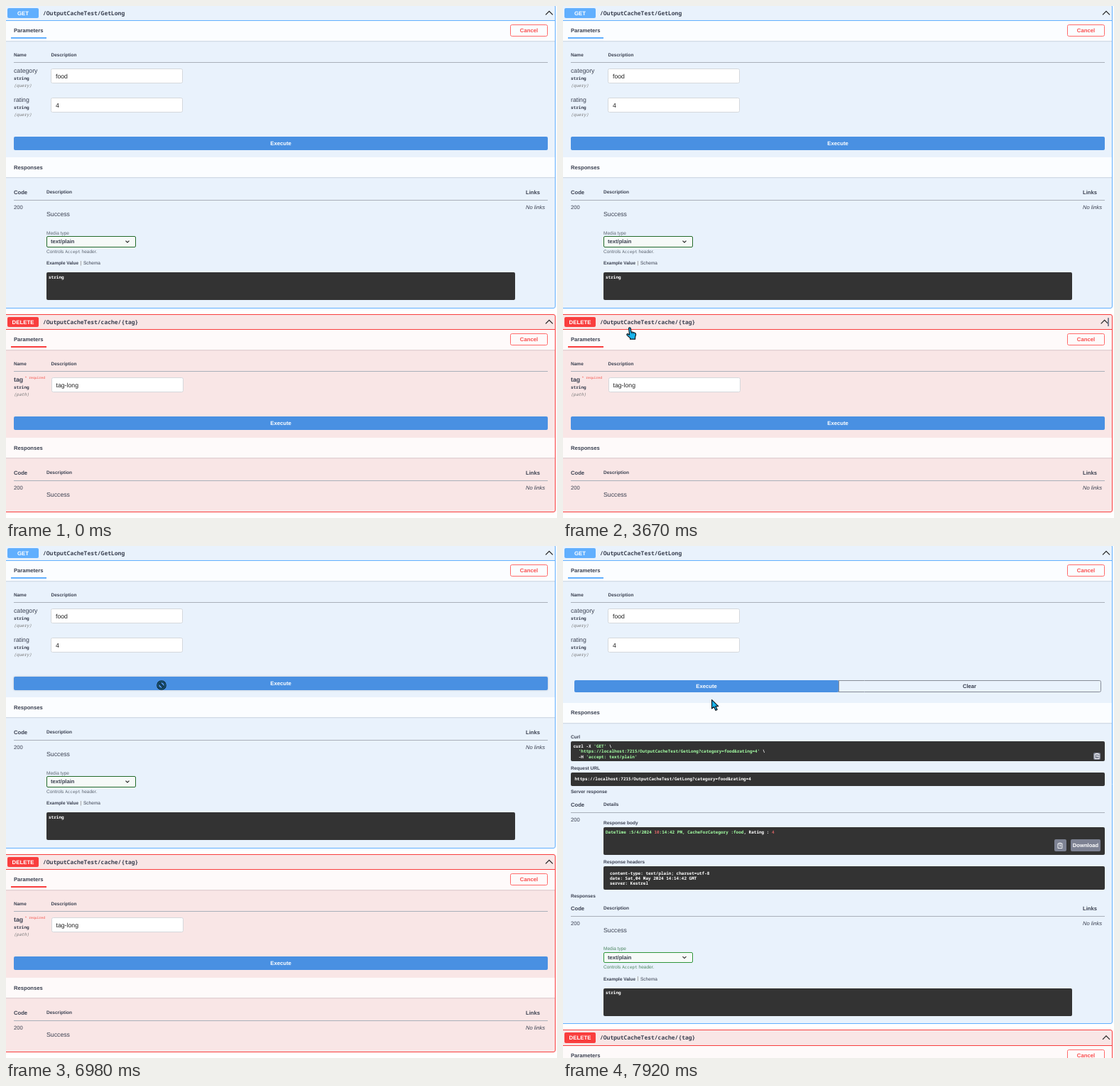
An HTML page with a canvas that plays this animation: 776x721 px, repeating every 7990 ms.

```html
<!DOCTYPE html>
<html lang="en">
<head>
<meta charset="utf-8">
<title>API console</title>
<style>
html, body { margin: 0; width: 100%; height: 100%; overflow: hidden; background: #fff; }
canvas { display: block; width: 776px; height: 721px; }
</style>
</head>
<body>
<canvas id="stage" width="776" height="721"></canvas>
<script>
const ctx = document.getElementById("stage").getContext("2d");
const LOOP = 7990, ENTER_AT = 515, OPEN_AT = 7085;
const SANS = '"Liberation Sans", Arial, sans-serif';
const MONO = '"Noto Sans Mono", "DejaVu Sans Mono", monospace';
const INK = "#3b4151", DARK = "#333", GREY = "#7d8293", LIME = "#a2fca2", RED = "#d36363";
const S = 6.54, M = 7.63, L = 8.72;
const BLUE = { main: "#61affe", body: "#e9f2fc", band: "#fbfdff" };
const ROSE = { main: "#f93e3e", body: "#f9e6e6", band: "#fefafa" };

// time, x, y of the pointer's hot spot
const PATH = [
  [515, 430, 410], [850, 387, 300], [1150, 342, 207], [1325, 333, 192], [1740, 333, 192],
  [2050, 285, 105], [2400, 170, 17], [2560, 130, 10], [2780, 100, 22], [3000, 98, 130],
  [3320, 140, 268], [3430, 130, 330], [3660, 94, 453], [3740, 92, 454], [3850, 78, 453],
  [4160, 80, 452], [4910, 188, 450], [5060, 189, 436], [5400, 160, 235], [5800, 82, 104],
  [5870, 84, 122], [6150, 122, 165], [6500, 212, 208], [6700, 218, 198], [6970, 219, 196],
  [7110, 218, 197], [7905, 218, 197], [7910, 209, 216]
];

const { round } = Math;
const clamp = v => Math.max(0, Math.min(1, v));
const mix = (a, b, k) => a + (b - a) * k;
const smooth = k => k * k * (3 - 2 * k);

// Baselines and edges sit on whole pixels, as a browser lays them out.
function text(str, x, y, size = M, { weight = 700, color = INK, font = SANS, style = "", align = "left" } = {}) {
  ctx.font = `${style} ${weight} ${size}px ${font}`;
  ctx.fillStyle = color;
  ctx.textAlign = align;
  ctx.fillText(str, x, round(y));
  return x + ctx.measureText(str).width;
}
const plain = (str, x, y, size, color = INK) => text(str, x, y, size, { weight: 400, color });
const mono = (str, x, y, color = "#fff", size = 6, weight = 700) =>
  text(str, x, y, size, { weight, color, font: MONO });
function runs(x, y, parts) {
  for (const [str, color] of parts) x = mono(str, x, y, color);
}

function rect(x, y, w, h, color) {
  ctx.fillStyle = color;
  ctx.fillRect(x, round(y), w, h);
}
function box(x, y, w, h, fill, stroke, r = 2) {
  const half = stroke ? 0.5 : 0;
  const left = round(x - half) + half, top = round(y - half) + half;
  const right = round(x + w - half) + half, bottom = round(y + h - half) + half;
  ctx.beginPath();
  ctx.roundRect(left, top, right - left, bottom - top, r);
  if (fill) { ctx.fillStyle = fill; ctx.fill(); }
  if (stroke) { ctx.strokeStyle = stroke; ctx.lineWidth = 1; ctx.stroke(); }
}
function poly(points, color, line) {
  ctx.beginPath();
  points.forEach(([x, y]) => ctx.lineTo(x, y));
  ctx.strokeStyle = color;
  ctx.lineWidth = line;
  ctx.stroke();
}
const rule = y => rect(11, y, 752, 1, "#a9b0ba");

function band(y, theme) {
  rect(0, y + 28, 773, 1, "rgba(60,65,80,.13)");
  rect(0, y + 29, 773, 1, "rgba(60,65,80,.04)");
  rect(0, y, 773, 28, theme.band);
}

function clip(cx, cy, w, h = w) {
  box(cx - w / 2, cy - h / 2, w, h, GREY);
  ctx.save();
  ctx.translate(round(cx), round(cy));
  poly([[-1, -3], [-3, -3], [-3, 3.5], [3, 3.5], [3, 1.5]], "#fff", 0.9);
  poly([[1, -3], [3, -3], [3, -1]], "#fff", 0.9);
  poly([[-1.5, -3.5], [1.5, -3.5]], "#fff", 1.2);
  poly([[4, 0.3], [-1, 0.3]], "#fff", 0.9);
  poly([[-1.5, -1.3], [1.5, -1.3]], "#fff", 0.6);
  ctx.restore();
}

function header(y, theme, verb, path, hover) {
  box(2, y + 2.5, 44, 14.5, theme.main);
  text(verb, 24, y + 12.5, 7.8, { color: "#fff", align: "center" });
  mono(path, 52, y + 12.5, INK, 8, 600);
  const x = 765 - 18 * hover;
  poly([[x - 5, y + 12.3], [x, y + 7.3], [x + 5, y + 12.3]], "#222", 1.2);
  if (hover > 0.9) clip(761.5, y + 10, 13);
  else if (hover > 0) box(769 - 14 * hover, y + 4, Math.max(1, 13 * hover), 12, GREY, null, 0.5);
}

function params(y, theme) {
  rect(0, y + 20, 773, 1, theme.main);
  band(y + 21, theme);
  text("Parameters", 11, y + 37);
  rect(7, y + 44, 50, 2, theme.main);
  box(710.5, y + 26.5, 52, 15.5, null, "#ff6a6a");
  text("Cancel", 736.5, y + 37, 7.75, { color: "#fa5050", align: "center" });
  text("Name", 11, y + 71.3, S);
  text("Description", 63.5, y + 71.3, S);
  rule(y + 79);
}

function field(y, name, kind, value, x = 63.5) {
  text(name, 11, y + 94, L, { weight: kind === "(path)" ? 700 : 400 });
  mono("string", 11, y + 104.3, INK);
  text(kind, 11, y + 114, 6, { weight: 400, style: "italic", font: MONO, color: "#777" });
  box(x, y + 88.5, 185, 19.5, "#fff", "#d5d8dc");
  plain(value, x + 6.5, y + 101.6, L, "#222");
}

function execute(y, hover) {
  ctx.save();
  if (hover) { ctx.shadowColor = "rgba(0,0,0,.2)"; ctx.shadowBlur = 3; }
  box(11, y, 752, 19, "#4990e2");
  ctx.restore();
  text("Execute", 387, y + 11.8, 7.7, { color: "#fff", align: "center" });
}

function codeRow(y, label, links) {
  text("Code", 11, y + 3);
  text(label, 57, y + 2.4, S);
  if (links) text("Links", 732, y + 3);
  rule(y + 11);
  plain("200", 11, y + 24.3, M);
}

function success(y) {
  codeRow(y, "Description", true);
  text("No links", 732, y + 24.3, M, { weight: 400, style: "italic" });
  plain("Success", 57, y + 34.3, L);
}

function media(y, open) {
  const note = open ? "#4c8560" : "#5d6570";
  plain("Media type", 57, y + 59.6, S, note);
  box(57, y + 62.5, 125, 14.5, "#f6faf8", open ? "#2f963a" : "#246b2a", 1.5);
  text("text/plain", 63, y + 72.3);
  poly([[168.5, y + 68.6], [171, y + 71], [173.5, y + 68.6]], "#222", 1.1);
  let x = plain("Controls ", 57, y + 85.6, S, note);
  x = mono("Accept", x, y + 85.6, note, 6, 500);
  plain(" header.", x, y + 85.6, S, note);
  text("Example Value", 57, y + 102, 6.45);
  rect(105, y + 96.5, 1, 6.5, "#aaa");
  plain("Schema", 109, y + 102, S);
  box(57, y + 113, 660, 39, DARK);
  mono("string", 60, y + 121.6);
}

function buttons(k) {
  const w = mix(75, 372, k), h = mix(19.5, 16.5, k), mid = 189 + h / 2 + 2.6;
  box(91, 189, 666, h, null, "#868c96");
  box(16, 189, w, h, "#e9f2fc");
  ctx.globalAlpha = mix(0.58, 1, k);
  box(16, 189, w, h, "#4990e2");
  ctx.globalAlpha = 1;
  rect(round(16 + w), 189, 1, round(h), "#868c96");
  text("Execute", 16 + w / 2, mid, 7.7, { color: "#fff", align: "center" });
  text("Clear", (16 + w + 757) / 2, mid, 7.7, { align: "center" });
}

function response(d) {
  const url = "https://localhost:7215/OutputCacheTest/GetLong?category=food&rating=4";
  text("Curl", 11, d + 274, S);
  box(11, d + 278, 752, 28.5, DARK);
  runs(14.5, d + 287.2, [["curl -X ", "#fff"], ["'GET'", LIME], [" \\", "#fff"]]);
  runs(14.5, d + 294.6, [[`  '${url}'`, LIME], [" \\", "#fff"]]);
  runs(14.5, d + 302, [["  -H ", "#fff"], ["'accept: text/plain'", LIME]]);
  clip(752, d + 299, 10);
  text("Request URL", 11, d + 318, S);
  box(11, d + 322.5, 752, 18.5, DARK);
  mono(url, 16.5, d + 333.8);
  text("Server response", 11, d + 351.8, S);
  codeRow(d + 367, "Details", false);
  text("Response body", 57, d + 395, S);
  box(57, d + 399.5, 706, 39, DARK);
  runs(60, d + 408.5, [["DateTime :5/4/2024 ", LIME], ["10", RED],
    [":14:42 PM, CacheForCategory :food", LIME], [", Rating : ", "#fff"], ["4", RED]]);
  clip(700, d + 425, 17, 16.5);
  box(715, d + 416.8, 42, 16.5, GREY);
  text("Download", 736, d + 427.6, 7.6, { color: "#fff", align: "center" });
  text("Response headers", 57, d + 450, S);
  box(57, d + 454.5, 706, 32.5, DARK);
  ["content-type: text/plain; charset=utf-8", "date: Sat,04 May 2024 14:14:42 GMT", "server: Kestrel"]
    .forEach((line, i) => mono(line, 66, d + 466 + i * 7.3));
  text("Responses", 11, d + 498.3, S);
}

function frame(y, h, theme) {
  box(-3.5, y, 777, h, theme.body, theme.main, 2.5);
}

function page(t, hover) {
  const open = t >= OPEN_AT;
  const k = open ? smooth(clamp((t - 7140) / 290)) : 0;
  const d = -3.4 * k, shift = open ? 251 + d : 0;
  const fade = (a, b) => clamp((t - a) / 200) * clamp((b + 150 - t) / 150);

  rect(0, 0, 776, 721, "#fff");
  frame(-1.5, 426.8 + shift, BLUE);
  header(0, BLUE, "GET", "/OutputCacheTest/GetLong", fade(2390, 2770));
  params(0, BLUE);
  field(0, "category", "(query)", "food");
  field(41, "rating", "(query)", "4");
  if (open) {
    buttons(k);
    band(224 + d, BLUE);
    text("Responses", 11, 240.8 + d);
    response(d);
  } else {
    execute(184, hover);
    band(213, BLUE);
    text("Responses", 11, 230);
  }
  success(262 + shift);
  media(262 + shift, open);

  const y = 435 + shift;
  frame(y - 0.7, 278, ROSE);
  header(y, ROSE, "DELETE", "/OutputCacheTest/cache/{tag}", fade(3645, 5060));
  params(y, ROSE);
  field(y, "tag", "(path)", "tag-long", 64);
  mono("* required", 26.5, y + 90.3, "#f5524a", 4.75, 500);
  execute(y + 143, false);
  band(y + 173, ROSE);
  text("Responses", 11, y + 190);
  success(y + 222);
}

function pointerAt(t) {
  const i = PATH.findIndex(p => p[0] > t);
  if (i < 0) return PATH[PATH.length - 1].slice(1);
  const a = PATH[i - 1], b = PATH[i], k = (t - a[0]) / (b[0] - a[0]);
  return [mix(a[1], b[1], k), mix(a[2], b[2], k)];
}

const within = (v, low, high) => v > low && v < high;
const overButton = (x, y, t) => within(x, 11, 763) && (t < OPEN_AT ? within(y, 184, 203) : within(y, 189, 206));

function shapeAt(x, y, t) {
  if (within(t, 6945, OPEN_AT)) return ban;
  if (overButton(x, y, t) || y < 20 || within(y, 434, 456)) return hand;
  if (within(x, 57, 182) && within(y, 324, 339)) return hand;
  if (within(x, 63, 249) && (within(y, 88, 108) || within(y, 129, 149))) return beam;
  return arrow;
}

function outline(d) {
  const p = new Path2D(d);
  ctx.fillStyle = "#19b5ee";
  ctx.fill(p);
  ctx.strokeStyle = "#10181f";
  ctx.lineWidth = 1.2;
  ctx.lineJoin = "round";
  ctx.stroke(p);
}
function arrow() {
  outline("M.6 .6V13L3.6 10.4L6 15.4L8.2 14.4L5.9 9.6H9.8Z");
}
function hand() {
  outline("M-1.4 .5Q0-1 1.2 .6L2 6L4 6.2L5.8 6.8L7.6 7.6Q8.8 8.3 8.6 10L7.6 13.4V16.2H.6V14.6L-3.8 10.6Q-4.8 9-3 8.6L-.4 10Z");
  poly([[2.2, 6], [2.5, 8.3]], "#10181f", 0.8);
  poly([[4.6, 6.6], [4.7, 8.6]], "#10181f", 0.8);
}
function beam() {
  poly([[-2, -6], [2, -6]], "#10181f", 1);
  poly([[0, -6], [0, 6]], "#10181f", 1.2);
  poly([[-2, 6], [2, 6]], "#10181f", 1);
}
function ring(color, line, bar) {
  ctx.beginPath();
  ctx.arc(0, 0, 5.3, 0, 7);
  ctx.strokeStyle = color;
  ctx.lineWidth = line;
  ctx.stroke();
  poly([[-3.7, -3.7], [3.7, 3.7]], color, bar);
}
function ban() {
  ring("#0c1a24", 3, 2.8);
  ring("#1c86b4", 0.9, 0.8);
}

function render(t) {
  ctx.textRendering = "geometricPrecision";
  const seen = t >= ENTER_AT;
  const [x, y] = seen ? pointerAt(t) : [-99, -99];
  page(t, seen && overButton(x, y, t));
  if (!seen) return;
  ctx.save();
  ctx.translate(round(x), round(y));
  shapeAt(x, y, t)();
  ctx.restore();
}

function tick() {
  render(performance.now() % LOOP);
  requestAnimationFrame(tick);
}
tick();
</script>
</body>
</html>
```
